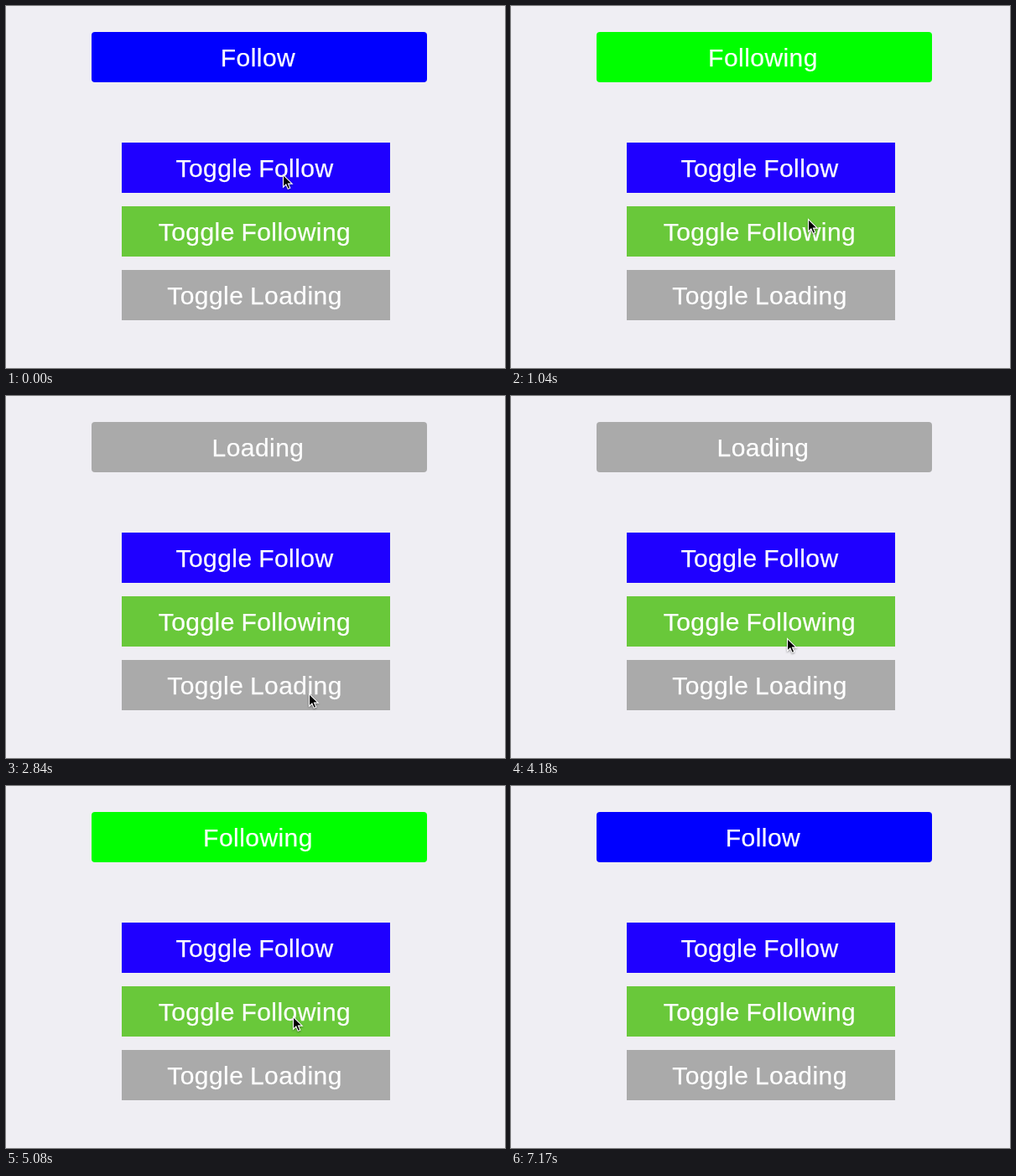
Animation of 595 by 432 pixels, one loop 7.8 s. Source, as an HTML page:

```html
<!DOCTYPE html>
<html lang="en">
<head>
<meta charset="utf-8">
<title>Follow button</title>
<style>
html, body { margin: 0; width: 100%; height: 100%; overflow: hidden; background: #efeef3; }
svg { display: block; width: 595px; height: 432px; }
text {
  font: 30px "Liberation Sans", Arial, sans-serif;
  letter-spacing: .45px; word-spacing: -1.2px; text-anchor: middle;
  fill: #fff; stroke: #fff; stroke-width: .25px;
}
#cursor { stroke: #fff; stroke-width: 1.1; filter: drop-shadow(0 1px 1px #0006); }
</style>
</head>
<body>
<svg viewBox="0 0 595 432">
  <rect id="face" x="102" y="31" width="400" height="60" rx="4"/>
  <text id="title" x="300.5" y="72.4"></text>
  <g id="toggles"></g>
  <path id="cursor" d="M.5 .5V15.2L3.9 12L6.2 17.4L8.8 16.3L6.5 11.1H11.2Z"/>
</svg>
<script>
const LOOP = 7800, STEP = 150, EXIT = 7170;
const $ = id => document.getElementById(id);
const face = $('face'), title = $('title'), cursor = $('cursor');

const states = {
  Follow: { face: '#00f', toggle: '#1f00ff' },
  Following: { face: '#0f0', toggle: '#69c83a' },
  Loading: { face: '#aaa', toggle: '#aaa' }
};

const labels = {};
Object.keys(states).forEach((name, i) => {
  const y = 163 + 76 * i;
  $('toggles').insertAdjacentHTML('beforeend',
    `<rect x="138" y="${y}" width="320" height="60" fill="${states[name].toggle}"/>
     <text x="296.5" y="${y + 41.4}">Toggle ${name}</text>`);
  labels[name] = $('toggles').lastElementChild;
});

// The pointer glides to each place in a few steps.
const home = { x: 330, y: 201 };
const moves = [
  { at: 140, steps: 3, x: 354, y: 254 },
  { at: 1490, steps: 3, x: 361, y: 355 },
  { at: 3880, steps: 3, x: 329, y: 289 },
  { at: 4480, steps: 2, x: 342, y: 275 },
  { at: 5230, steps: 2, x: 334, y: 180 },
  { at: 7020, steps: 1, x: 358, y: 200 }
];

// A press dims the label; the release changes the button.
const clicks = [
  { press: 740, release: 740, to: 'Following' },
  { press: 2390, release: 2540, to: 'Loading' },
  { press: 4630, release: 4780, to: 'Following' },
  { press: 5830, release: 5830, to: 'Follow' }
];

const stepsSince = (t, at) => Math.floor((t - at) / STEP);
const smooth = p => p * p * (3 - 2 * p);
const fade = (from, step) => 1 - (1 - from) * Math.max(0, 1 - step / 3) ** 3;

function drawCursor(t) {
  let { x, y } = home;
  for (const move of moves) {
    if (t < move.at) break;
    const e = smooth(Math.min(1, (stepsSince(t, move.at) + 1) / move.steps));
    x += (move.x - x) * e;
    y += (move.y - y) * e;
  }
  cursor.setAttribute('transform', `translate(${Math.round(x)} ${Math.round(y)})`);
  cursor.setAttribute('visibility', t < EXIT ? 'visible' : 'hidden');
}

function drawButtons(t) {
  let shown = 'Follow', text = shown, alpha = 1;
  for (const name in labels) labels[name].setAttribute('opacity', 1);

  for (const { press, release, to } of clicks) {
    if (t < press) break;
    const step = stepsSince(t, release), held = step < 0;
    labels[to].setAttribute('opacity', held ? .18 : fade(.32, step));
    if (held) break;
    text = step ? to : shown;
    alpha = fade(.45, step);
    shown = to;
  }
  face.setAttribute('fill', states[shown].face);
  title.textContent = text;
  title.setAttribute('opacity', alpha);
}

const start = performance.now();
function tick() {
  const t = (performance.now() - start) % LOOP;
  drawCursor(t);
  drawButtons(t);
  requestAnimationFrame(tick);
}
tick();
</script>
</body>
</html>
```
